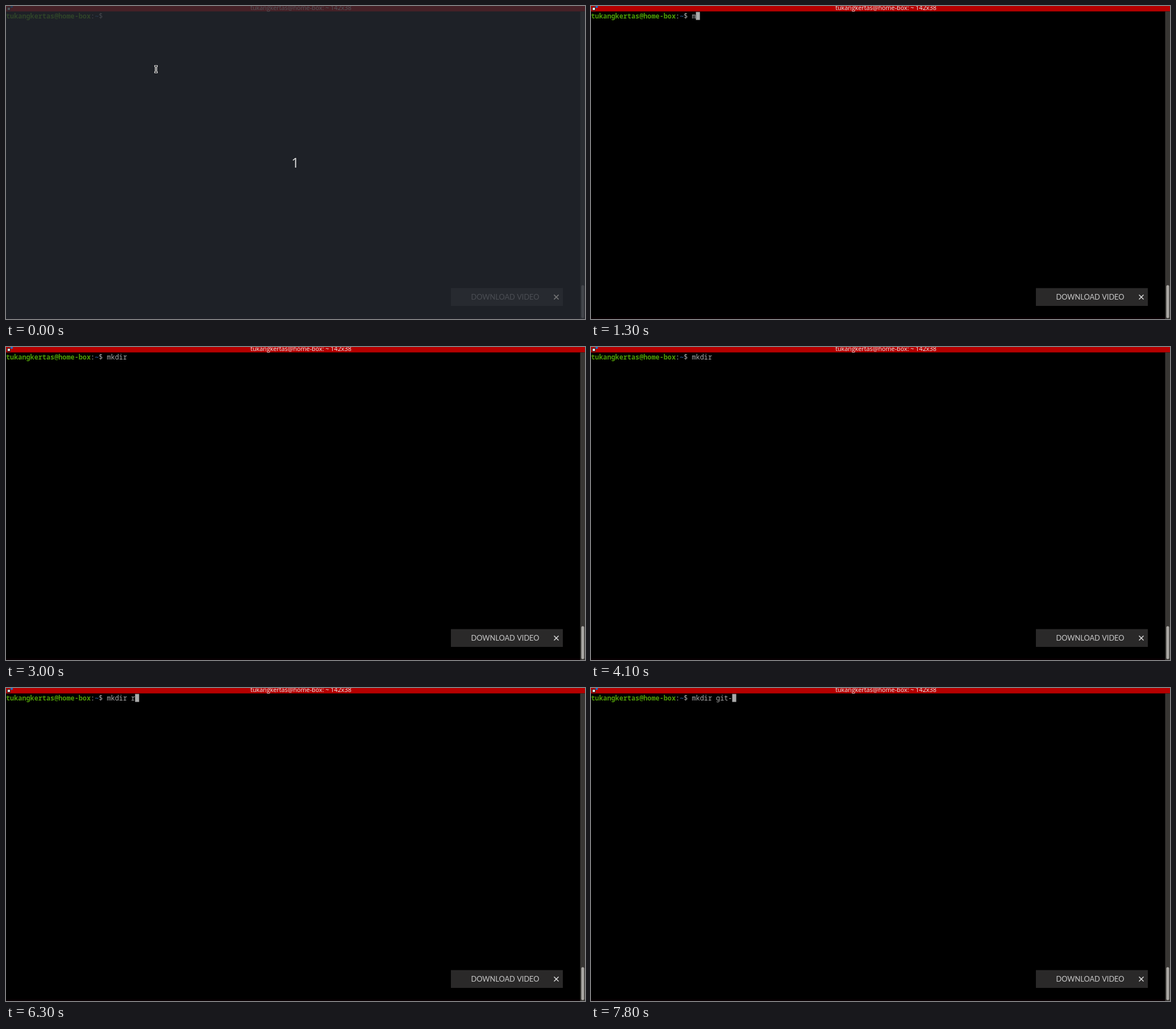
These frames come from a looping animation (1019 px wide and 550 px high, 8000 ms). An HTML page with a canvas:

```html
<!DOCTYPE html>
<html lang="en">
<head>
<meta charset="utf-8">
<title>Terminal</title>
<style>
  html, body { margin: 0; width: 100%; height: 100%; overflow: hidden; background: #000; }
  canvas { display: block; }
</style>
</head>
<body>
<canvas id="stage" width="1019" height="550"></canvas>
<script>
const ctx = document.getElementById('stage').getContext('2d');
const LOOP = 8000, CELL = 7.1, PROMPT_LEN = 25;
const MONO = '11.83px "Noto Sans Mono", "DejaVu Sans Mono", monospace';
const USER = 'tukangkertas@home-box';

// [start ms, typed text, block cursor visible]
const states = [
  [0, '', false], [300, '', true], [900, '', false],
  [1200, 'm', true], [1700, 'mk', true], [1800, 'mkd', true],
  [2000, 'mkdi', true], [2100, 'mkdir', true], [2400, 'mkdir ', true],
  [3000, 'mkdir ', false], [3600, 'mkdir ', true],
  [4100, 'mkdir ', false], [4800, 'mkdir ', true],
  [5400, 'mkdir r', true], [5500, 'mkdir re', true],
  [6300, 'mkdir r', true], [6600, 'mkdir ', true],
  [6800, 'mkdir g', true], [7000, 'mkdir gi', true], [7100, 'mkdir git', true],
  [7700, 'mkdir git', false], [7800, 'mkdir git-', true]
];

function rect(color, x, y, w, h) {
  ctx.fillStyle = color;
  ctx.fillRect(x, y, w, h);
}

function text(str, x, y, font, color, align = 'left') {
  ctx.font = font;
  ctx.fillStyle = color;
  ctx.textAlign = align;
  ctx.fillText(str, x, y);
}

function mono(str, col, color, weight = '') {
  text(str, col * CELL, 22, weight + MONO, color);
}

function cross(color) {
  ctx.strokeStyle = color;
  ctx.lineWidth = 1.4;
  ctx.beginPath();
  ctx.moveTo(964.5, 507.5); ctx.lineTo(972.5, 515.5);
  ctx.moveTo(972.5, 507.5); ctx.lineTo(964.5, 515.5);
  ctx.stroke();
}

function drawWindow() {
  rect('#000', 0, 0, 1019, 550);
  rect('#b60000', 0, 0, 1019, 9.5);
  rect('#080003', 0, 547, 1019, 3);
  text(USER + ': ~ 142x38', 519, 7, '10.8px "Open Sans", "Noto Sans", sans-serif', '#eee', 'center');

  // pane grouping button
  rect('#222', 2, 2, 6, 6);
  rect('#e8e8e8', 3, 3, 4, 4);
  rect('#1c6fc4', 8, 0, 4, 3);

  rect('#383633', 1010.5, 9.5, 8.5, 540.5);
  ctx.fillStyle = '#aaa8a4';
  ctx.beginPath();
  ctx.roundRect(1012.5, 490.5, 5, 58, 2.5);
  ctx.fill();
}

function drawLine(typed, cursor) {
  mono(USER, 0, '#4e9a06', 'bold ');
  mono(':', 21, '#aaa');
  mono('~', 22, '#3465a4', 'bold ');
  mono('$', 23, '#aaa');
  mono(typed, PROMPT_LEN, '#aaa');
  if (cursor) rect('#aaa', (PROMPT_LEN + typed.length) * CELL, 10.5, CELL, 14);
}

function drawButton() {
  rect('#2a2929', 783, 495.7, 197, 31.3);
  text('DOWNLOAD VIDEO', 878.5, 516, '12.8px Lato, sans-serif', '#c8c8c8', 'center');
  cross('#e4e4e4');
}

function drawPointer() {
  rect('#ddd', 261, 104, 6, 3);
  rect('#ddd', 261, 115, 6, 3);
  rect('#ddd', 262, 106, 4, 10);
  rect('#000', 262, 105, 4, 1);
  rect('#000', 262, 116, 4, 1);
  rect('#000', 263.5, 105, 1, 12);
}

function draw(t) {
  const [, typed, cursor] = states.findLast(s => s[0] <= t);
  drawWindow();
  drawLine(typed, cursor);
  drawButton();
  if (t < 200) {
    rect('rgba(39,43,51,.78)', 0, 0, 1019, 550);
    cross('#777');
    text('1', 509, 284, '24px "Open Sans", "Noto Sans", sans-serif', '#ddd', 'center');
  }
  if (t < 1300) drawPointer();
}

const start = performance.now();
function tick() {
  draw((performance.now() - start) % LOOP);
  requestAnimationFrame(tick);
}
tick();
</script>
</body>
</html>
```
